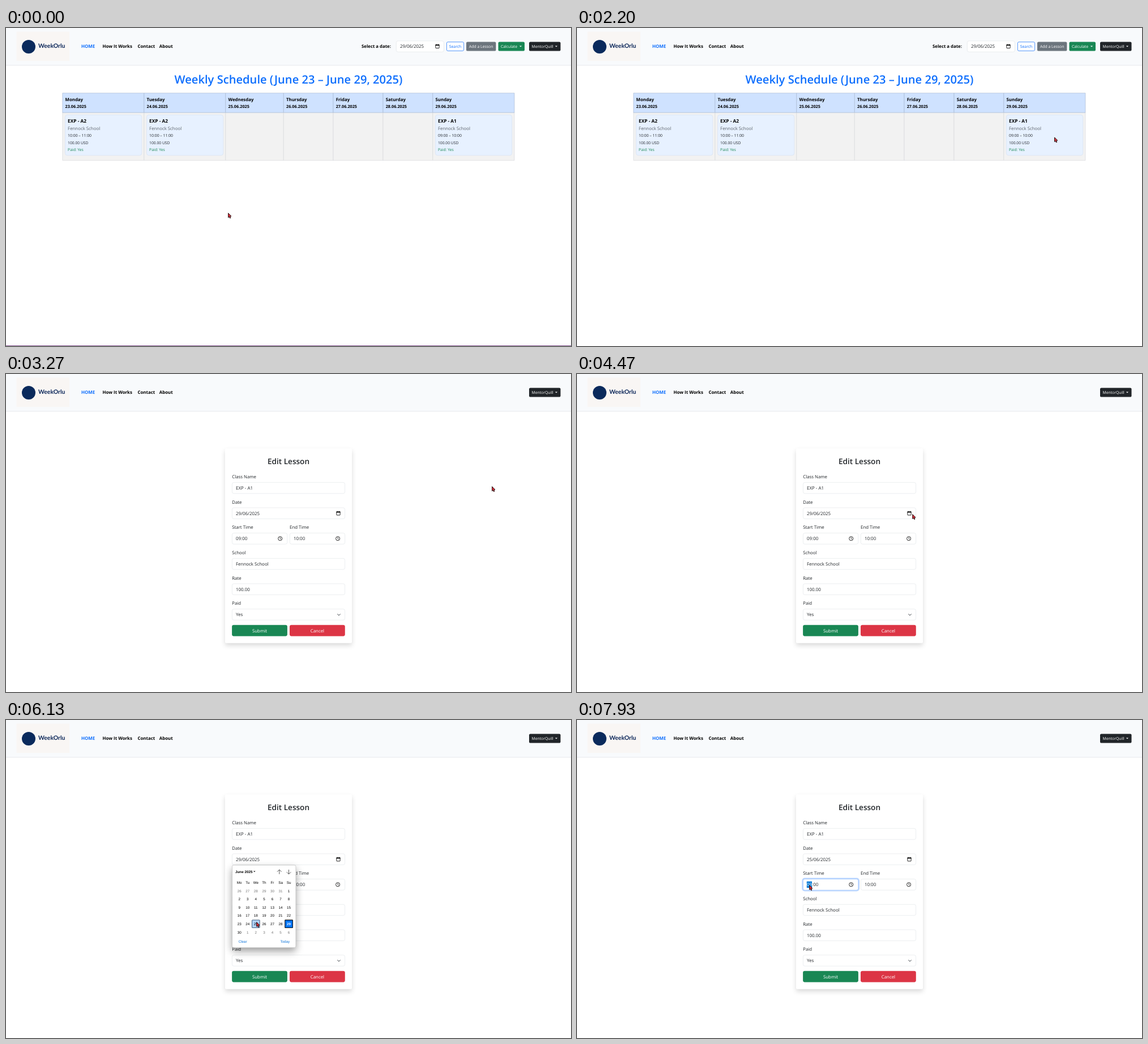
These frames come from a looping animation (998x561 px, 8000 ms). An HTML page with a canvas:

```html
<!DOCTYPE html>
<html lang="en">
<head>
<meta charset="utf-8">
<title>Lesson planner</title>
<style>
  html, body { margin: 0; width: 100%; height: 100%; overflow: hidden; background: #fff; }
  canvas { display: block; }
</style>
</head>
<body>
<canvas id="stage" width="998" height="561"></canvas>
<script>
const ctx = document.getElementById('stage').getContext('2d');
ctx.textRendering = 'geometricPrecision';
const UI = '"Open Sans", "Noto Sans", sans-serif';
const ARIAL = '"Liberation Sans", Arial, sans-serif';
const BLUE = '#0d6efd', GREEN = '#198754', DARK = '#212529', GREY = '#6c757d', LINE = '#dee2e6';
const SCHOOL = 'Fennock School';

const LOOP = 8000, FPS = 15;
const LINE_GONE = 1460, FORM_OPEN = 3260, PICKER_OPEN = 4990, PICKER_CLOSE = 6325, TIME_FOCUS = 7660;

// Pointer path: time, x, y
const PATH = [
  [467, 392, 326], [733, 640, 294], [1000, 814, 237], [1270, 842, 192], [2133, 842, 192],
  [2600, 858, 198], [3667, 858, 198], [4000, 736, 226], [4470, 592, 247], [4800, 586, 246],
  [5200, 586, 246], [5533, 480, 307], [6070, 442, 356], [6267, 442, 356], [6800, 458, 286],
  [7330, 425, 288], [7800, 410, 291]
];

// y is the middle of the capital letters
function text(str, x, y, size, color = DARK, { weight = 400, align = 'left', font = UI } = {}) {
  ctx.font = `${weight} ${size}px ${font}`;
  ctx.textAlign = align;
  ctx.fillStyle = color;
  ctx.fillText(str, x, y + size * 0.357);
}

function box(x, y, w, h, r, fill, stroke, lineWidth = 0.6) {
  ctx.beginPath();
  ctx.roundRect(x, y, w, h, r);
  if (fill) { ctx.fillStyle = fill; ctx.fill(); }
  if (stroke) { ctx.strokeStyle = stroke; ctx.lineWidth = lineWidth; ctx.stroke(); }
}

function shadowBox(x, y, w, h, r, offset, blur, alpha) {
  ctx.save();
  ctx.shadowColor = `rgba(0,0,0,${alpha})`;
  ctx.shadowOffsetY = offset;
  ctx.shadowBlur = blur;
  box(x, y, w, h, r, '#fff');
  ctx.restore();
}

function lines(color, width, ...paths) {
  ctx.strokeStyle = color;
  ctx.lineWidth = width;
  ctx.beginPath();
  for (const [start, ...rest] of paths) {
    ctx.moveTo(...start);
    rest.forEach(p => ctx.lineTo(...p));
  }
  ctx.stroke();
}

function polygon(points, fill) {
  ctx.beginPath();
  points.forEach(p => ctx.lineTo(...p));
  ctx.closePath();
  ctx.fillStyle = fill;
  ctx.fill();
}

const caret = (x, y, r, color) => polygon([[x - r, y - r / 2], [x + r, y - r / 2], [x, y + r / 2]], color);
const navButton = (x, w, fill) => box(x, 24.4, w, 16.2, 2.2, fill);

function calendarIcon(x, y) {
  box(x - 3.1, y - 2.7, 6.2, 5.9, 0.5, null, '#111', 0.9);
  ctx.fillStyle = '#111';
  ctx.fillRect(x - 3.5, y - 3.2, 7, 1.9);
  ctx.fillRect(x - 2.4, y - 4, 0.9, 1);
  ctx.fillRect(x + 1.5, y - 4, 0.9, 1);
}

function clockIcon(x, y) {
  box(x - 3.5, y - 3.5, 7, 7, 3.5, null, '#111', 0.9);
  lines('#111', 0.8, [[x, y - 2.2], [x, y + 0.2], [x + 1.7, y + 1.2]]);
}

function drawNavbar() {
  ctx.fillStyle = '#f8fafc';
  ctx.fillRect(0, 0, 998, 66);
  ctx.fillStyle = '#e3e6e9';
  ctx.fillRect(0, 65.5, 998, 0.8);
  ctx.fillStyle = '#f9f6f4';
  ctx.fillRect(18.5, 6.5, 93.5, 51.5);
  box(28, 21, 24, 24, 12, '#0a2a5c');
  text('WeekOrlu', 57, 31, 10.4, '#0a2558', { weight: 700, font: 'Lato, sans-serif' });
  [['HOME', 133, BLUE], ['How It Works', 170.5], ['Contact', 232.4], ['About', 270.8]]
    .forEach(([label, x, color = '#000']) => text(label, x, 32.6, 7.9, color, { weight: 700 }));
  navButton(924, 55.5, DARK);
  text('MentorQuill', 928.6, 32.8, 6.8, '#fff');
  caret(972, 32.5, 2.1, '#fff');
}

function drawLessonCard(x, name, time) {
  box(x, 153.3, 135.4, 71.4, 4, '#e7f1ff', '#d3e0f0');
  text(name, x + 4.7, 164.4, 8.3, '#000', { weight: 700 });
  text(SCHOOL, x + 4.7, 177.1, 7.85, '#5c636a');
  text(time, x + 4.7, 189.7, 6.85);
  text('100.00 USD', x + 4.7, 202.2, 6.75);
  text('Paid: Yes', x + 4.7, 214.8, 6.75, GREEN);
}

function drawSchedule() {
  text('Select a date:', 628, 32.6, 7.8, '#000', { weight: 700 });
  box(689.3, 22.8, 84, 19.4, 3.1, '#fff', LINE);
  text('29/06/2025', 696, 32.6, 7.95);
  calendarIcon(762, 32.4);
  box(778.4, 24.7, 30.2, 15.6, 2.2, '#fff', BLUE, 0.7);
  text('Search', 793.5, 32.8, 6.8, BLUE, { align: 'center' });
  navButton(813, 52.4, GREY);
  text('Add a Lesson', 839.2, 32.8, 6.85, '#fff', { align: 'center' });
  navButton(869.5, 46.5, GREEN);
  text('Calculate', 874, 32.8, 6.85, '#fff');
  caret(909, 32.5, 2.1, '#fff');

  text('Weekly Schedule (June 23 – June 29, 2025)', 499, 91, 20.15, BLUE, { weight: 600, align: 'center' });

  const edges = [99.8, 243.8, 387.8, 490.3, 578, 666, 753.8, 898];
  const days = ['Monday', 'Tuesday', 'Wednesday', 'Thursday', 'Friday', 'Saturday', 'Sunday'];
  days.forEach((day, i) => {
    const x = edges[i], w = edges[i + 1] - x;
    box(x, 149.2, w, 84.3, 0, '#f2f2f2', '#d3d6d9');
    box(x, 114.8, w, 34.4, 0, '#cfe2ff', '#a6b5cc');
    text(day, x + 4.7, 126.2, 7.85, '#000', { weight: 700 });
    text(`${23 + i}.06.2025`, x + 4.7, 138.8, 7.28, '#000', { weight: 700 });
  });
  drawLessonCard(104.4, 'EXP - A2', '10:00 – 11:00');
  drawLessonCard(248.4, 'EXP - A2', '10:00 – 11:00');
  drawLessonCard(758.3, 'EXP - A1', '09:00 – 10:00');
}

const ROW = 44.67;

function drawField(label, value, row, x = 399.4, w = 199.2, focused = false) {
  const y = 191.3 + row * ROW;
  text(label, x - 0.2, y - 10.1, 7.85);
  if (focused) box(x - 1.1, y - 1.1, w + 2.2, 21.7, 4, null, 'rgba(13,110,253,.28)', 2.2);
  box(x, y, w, 19.5, 3.1, '#fff', focused ? '#86b7fe' : LINE);
  text(value, x + 6.6, y + 10, 7.95);
}

function drawForm(t) {
  shadowBox(387, 131.3, 224, 343.4, 2, 4.2, 8.3, 0.15);
  text('Edit Lesson', 499, 154, 13.6, DARK, { weight: 600, align: 'center' });

  const focused = t >= TIME_FOCUS;
  drawField('Class Name', 'EXP - A1', 0);
  drawField('Date', t < PICKER_CLOSE ? '29/06/2025' : '25/06/2025', 1);
  drawField('Start Time', '09:00', 2, 399.4, 97.4, focused);
  drawField('End Time', '10:00', 2, 501.3, 97.4);
  drawField('School', SCHOOL, 3);
  drawField('Rate', '100.00', 4);
  drawField('Paid', 'Yes', 5);
  if (focused) {
    ctx.fillStyle = '#0078d7';
    ctx.fillRect(405.8, 284.8, 9.2, 11.2);
    text('09', 406, 290.6, 7.95, '#fff');
  }
  calendarIcon(587, 245.8);
  clockIcon(484.2, 290.3);
  clockIcon(586.1, 290.3);
  lines('#343a40', 1, [[585.4, 423.3], [588, 425.9], [590.6, 423.3]]);

  box(399.1, 442.7, 97.8, 19.7, 3.1, GREEN);
  text('Submit', 448, 452.7, 7.9, '#fff', { align: 'center' });
  box(501, 442.7, 97.8, 19.7, 3.1, '#dc3545');
  text('Cancel', 549.9, 452.7, 7.9, '#fff', { align: 'center' });
}

function drawPicker([px, py]) {
  const size = 6.3, cell = 14.57, left = 404.9, top = 294.1;
  const center = { align: 'center', font: ARIAL };
  shadowBox(399.6, 256, 112.3, 145.4, 2.5, 6, 14, 0.4);
  box(399.6, 256, 112.3, 145.4, 2.5, '#fff', '#b4b4b4');
  text('June 2025', 405, 267.4, size, '#000', { weight: 700, font: ARIAL });
  caret(438.8, 267.4, 1.8, '#000');
  for (const [x, dir] of [[482.8, -1], [499.5, 1]]) {
    const tip = 268 + 4 * dir;
    lines('#333', 0.8, [[x, 268 - 4 * dir], [x, tip]],
      [[x - 3.8, tip - 3.8 * dir], [x, tip], [x + 3.8, tip - 3.8 * dir]]);
  }
  ['Mo', 'Tu', 'We', 'Th', 'Fr', 'Sa', 'Su']
    .forEach((d, i) => text(d, left + cell * (i + 0.5), 286.6, size, '#000', center));

  const hoverCol = Math.floor((px - left) / cell), hoverRow = Math.floor((py - top) / cell);
  for (let i = 0; i < 42; i++) {
    const col = i % 7, row = Math.floor(i / 7), day = i - 5;
    const x = left + col * cell, y = top + row * cell;
    const inMonth = day >= 1 && day <= 30, selected = day === 29;
    if (selected) box(x + 0.5, y + 0.5, cell - 1, cell - 1, 0.5, '#0075ff', '#101010', 1.1);
    else if (col === hoverCol && row === hoverRow) box(x + 0.5, y + 0.5, cell - 1, cell - 1, 0.5, '#b0d3fb', '#34516f', 0.9);
    const label = day < 1 ? day + 31 : day > 30 ? day - 30 : day;
    text(label, x + cell / 2, y + cell / 2 + 0.1, size, selected ? '#fff' : inMonth ? '#000' : '#757575',
      { ...center, weight: selected ? 700 : 400 });
  }
  text('Clear', 418.2, 390.6, size, '#0b73d9', center);
  text('Today', 492.8, 390.6, size, '#0b73d9', center);
}

// Monotone cubic interpolation along PATH
function pointerAt(t) {
  const last = PATH.length - 1;
  if (t <= PATH[0][0]) return PATH[0].slice(1);
  if (t >= PATH[last][0]) return PATH[last].slice(1);
  const i = PATH.findIndex(p => p[0] > t) - 1;
  const span = PATH[i + 1][0] - PATH[i][0], u = (t - PATH[i][0]) / span;
  return [1, 2].map(axis => {
    const slope = k => k < 0 || k >= last ? 0 : (PATH[k + 1][axis] - PATH[k][axis]) / (PATH[k + 1][0] - PATH[k][0]);
    const tangent = k => {
      const a = slope(k - 1), b = slope(k);
      return a * b > 0 ? 2 * a * b / (a + b) : 0;
    };
    const a = PATH[i][axis], b = PATH[i + 1][axis];
    return a + (b - a) * u * u * (3 - 2 * u)
      + span * u * (1 - u) * ((1 - u) * tangent(i) - u * tangent(i + 1));
  });
}

function drawPointer([x, y]) {
  const shape = [[0.6, 0.6], [0.6, 8.4], [2.4, 7], [3.6, 9.6], [4.8, 9], [3.8, 6.5], [5.9, 6]];
  polygon(shape.map(([dx, dy]) => [x + dx, y + dy]), '#d9303c');
  ctx.strokeStyle = '#16080a';
  ctx.lineWidth = 0.9;
  ctx.stroke();
}

function render(now) {
  const t = Math.floor((now % LOOP + 4) * FPS / 1000) * 1000 / FPS % LOOP;
  ctx.fillStyle = '#fff';
  ctx.fillRect(0, 0, 998, 561);
  drawNavbar();
  if (t < FORM_OPEN) drawSchedule();
  else drawForm(t);
  if (t >= PICKER_OPEN && t < PICKER_CLOSE) drawPicker(pointerAt(t - 40));
  if (t < LINE_GONE) {
    ctx.fillStyle = '#85558f';
    ctx.fillRect(0, 560, 998, 1);
  }
  drawPointer(pointerAt(t));
}

const start = performance.now();
function tick() {
  render(performance.now() - start);
  requestAnimationFrame(tick);
}
tick();
</script>
</body>
</html>
```
